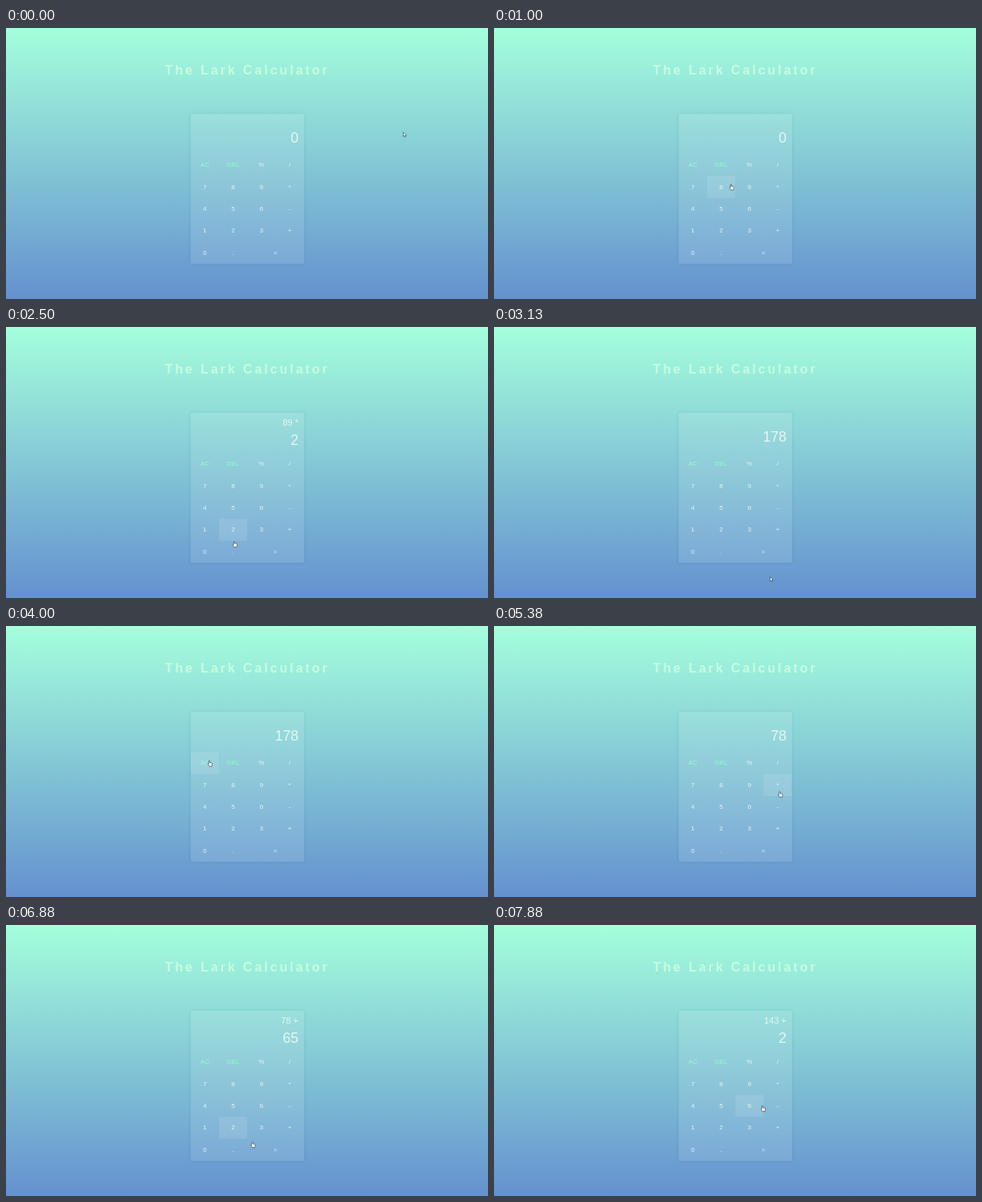
These frames come from a looping animation (600 by 338 pixels, 8 s). An HTML page:

```html
<!DOCTYPE html>
<html lang="en">
<head>
<meta charset="utf-8">
<title>Calculator</title>
<style>
  html, body { margin: 0; width: 100%; height: 100%; overflow: hidden; background: #6491cf; }
  svg { display: block; width: 100vw; height: 100vh; font-family: "Liberation Sans", Arial, sans-serif; }
  .title { font-size: 16px; font-weight: bold; letter-spacing: 2.92px; fill: #c6fde0; }
  .key { font-size: 8px; text-anchor: middle; fill: #e2f5f5; }
  .mint { fill: #92fdcc; }
  .out { text-anchor: end; fill: #e2f7f5; }
</style>
</head>
<body>
<svg viewBox="0 0 600 338" preserveAspectRatio="none">
  <defs>
    <linearGradient id="sky" x1="0" y1="0" x2="0" y2="1">
      <stop offset="0" stop-color="#a4ffdc"/>
      <stop offset="1" stop-color="#6491cf"/>
    </linearGradient>
    <filter id="blur" x="-20%" y="-20%" width="140%" height="140%">
      <feGaussianBlur stdDeviation="2"/>
    </filter>
    <mask id="outside">
      <rect width="600" height="338" fill="#fff"/>
      <rect x="230" y="107" width="141" height="187" rx="2" fill="#000"/>
    </mask>
  </defs>
  <rect width="600" height="338" fill="url(#sky)"/>
  <text class="title" x="197.7" y="58.1">The Lark Calculator</text>
  <g mask="url(#outside)">
    <rect x="230" y="107" width="141" height="187" rx="2" fill="#2d6482" opacity=".15" filter="url(#blur)"/>
  </g>
  <rect x="230" y="107" width="141" height="187" rx="2" fill="#fff" opacity=".1"/>
  <rect id="hover" fill="#fff" opacity=".1"/>
  <g id="keys"></g>
  <text id="previous" class="out" x="364" font-size="11"></text>
  <text id="current" class="out" x="364" font-size="17.6"></text>
  <g id="pointer" fill="#fff" stroke="#34505f" stroke-width=".7" stroke-linejoin="round">
    <path id="arrow" d="M0 0V5.3L1.3 4.2L2.2 6.1L3.1 5.7L2.3 3.8H3.9Z"/>
    <path id="hand" d="M-.6 .6Q0 -.5 .7 .6V2.8L3.3 3.4Q4 3.7 3.8 4.8L3.1 7.6H.2L-1.7 4.7Q-1.6 3.7 -.6 4.4Z"/>
  </g>
</svg>
<script>
const LOOP = 8000, STEP = 125, HOVER_LAG = 60;
const LEFT = 230, TOP = 157.4, COL = 35.15, ROW = 27.3;
const LAYOUT = ["AC DEL % /", "7 8 9 *", "4 5 6 -", "1 2 3 +", "0 . ="];

const el = Object.fromEntries([...document.querySelectorAll("[id]")].map(n => [n.id, n]));
const set = (node, attrs) => Object.entries(attrs).forEach(([k, v]) => node.setAttribute(k, v));

const keys = LAYOUT.flatMap((row, r) => row.split(" ").map((label, c) => ({
  label, x: LEFT + c * COL, y: TOP + r * ROW, w: label === "=" ? COL * 2 : COL
})));

for (const { label, x, y, w } of keys) {
  const text = document.createElementNS("http://www.w3.org/2000/svg", "text");
  set(text, { class: label.length > 1 ? "key mint" : "key", x: x + w / 2, y: y + 15.9 });
  text.textContent = label;
  el.keys.append(text);
}

const keyAt = ({ x, y }) =>
  keys.find(k => x >= k.x && x < k.x + k.w && y >= k.y && y < k.y + ROW);

// Runs of evenly paced key presses
const run = (start, pace, labels) =>
  labels.split(" ").map((label, i) => ({ t: start + i * pace, label }));
const presses = [
  run(1125, 375, "8 9 * 2"), run(2750, 0, "="), run(4125, 500, "AC 7 8"),
  run(5750, 375, "+ 6 5"), run(7125, 250, "= + 2")
].flat();

// The pointer visits each pressed key, with a few detours
const detours = [
  [0, 494.5, 130], [250, 494.5, 130], [1000, 295, 194.5], [2500, 284, 267], [3250, 345, 318],
  [4000, 253, 167.5], [5375, 355.5, 206], [6750, 290, 252], [6875, 306.5, 270], [7875, 334, 225]
].map(([t, x, y]) => ({ t, x, y }));
const visits = presses.map(({ t, label }) => {
  const key = keys.find(k => k.label === label);
  return { t, x: key.x + key.w / 2 + 1, y: key.y + ROW / 2 - 3 };
});
const path = [...detours, ...visits].sort((a, b) => a.t - b.t);

function pointerAt(t) {
  const from = path.findLast(p => p.t <= t) || path[0];
  const to = path.find(p => p.t > t) || from;
  const u = to.t > from.t ? Math.max(0, (t - from.t) / (to.t - from.t)) : 0;
  const ease = u * u * (3 - 2 * u);
  return { x: from.x + (to.x - from.x) * ease, y: from.y + (to.y - from.y) * ease };
}

const operate = {
  "+": (a, b) => a + b, "-": (a, b) => a - b, "*": (a, b) => a * b, "/": (a, b) => a / b
};

function press({ previous, current }, { label }) {
  if (label === "AC") return { previous: "", current: "0" };
  if (label in operate) return { previous: `${current} ${label}`, current: "" };
  if (label === "=") {
    const [operand, operator] = previous.split(" ");
    return { previous: "", current: String(operate[operator](+operand, +current)) };
  }
  return { previous, current: current === "0" ? label : current + label };
}

function render(t) {
  const tip = pointerAt(t);
  const onKey = Boolean(keyAt(tip));
  set(el.pointer, { transform: `translate(${tip.x} ${tip.y})` });
  set(el.hand, { visibility: onKey ? "visible" : "hidden" });
  set(el.arrow, { visibility: onKey ? "hidden" : "visible" });

  const key = keyAt(pointerAt(t - HOVER_LAG));
  set(el.hover, key ? { x: key.x, y: key.y, width: key.w, height: ROW } : { width: 0, height: 0 });

  const { previous, current } = presses.filter(p => p.t <= t).reduce(press, { previous: "", current: "0" });
  el.previous.textContent = previous;
  el.current.textContent = current;
  set(el.previous, { y: current ? 122.7 : 127 });
  set(el.current, { y: previous ? 147.4 : 143.4 });
}

const start = performance.now();
function frame() {
  render(Math.floor((performance.now() - start) % LOOP / STEP) * STEP);
  requestAnimationFrame(frame);
}
frame();
</script>
</body>
</html>
```
